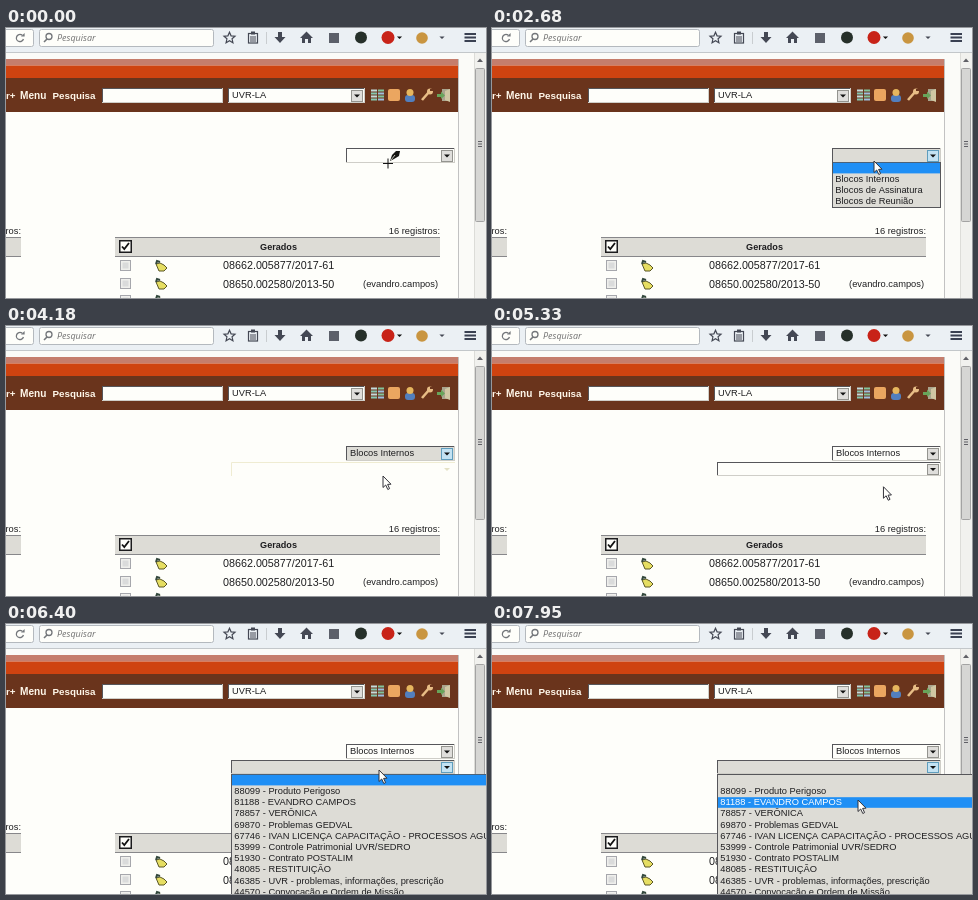
Write an HTML page with a canvas that moves like this. It is 480 by 270 pixels and loops after 8 s.

```html
<!DOCTYPE html>
<html lang="pt-BR">
<head>
<meta charset="utf-8">
<title>Blocos</title>
<style>
html, body { margin: 0; width: 100%; height: 100%; overflow: hidden; background: #fefefa; }
canvas { display: block; width: 480px; height: 270px; }
</style>
</head>
<body>
<canvas id="stage"></canvas>
<script>
const LOOP = 8000;
const SANS = '"Liberation Sans", Arial, sans-serif';
const INK = '#1e1e20', PANEL = '#dddcd6', PAPER = '#fefefa', BLUE = '#1f8ff5';
const ROW = 11.2;
const canvas = document.getElementById('stage');
const ctx = canvas.getContext('2d');
const ratio = window.devicePixelRatio || 1;
canvas.width = 480 * ratio;
canvas.height = 270 * ratio;
ctx.scale(ratio, ratio);

const blockTypes = ['', 'Blocos Internos', 'Blocos de Assinatura', 'Blocos de Reunião'];
const blocks = [
  '', '88099 - Produto Perigoso', '81188 - EVANDRO CAMPOS', '78857 - VERÔNICA',
  '69870 - Problemas GEDVAL', '67746 - IVAN LICENÇA CAPACITAÇÃO - PROCESSOS AGUARDANDO',
  '53999 - Controle Patrimonial UVR/SEDRO', '51930 - Contrato POSTALIM',
  '48085 - RESTITUIÇÃO', '46385 - UVR - problemas, informações, prescrição',
  '44570 - Convocação e Ordem de Missão'
];

// Moments of the interaction, in ms
const AT = { arrow: 950, typesOpen: 1930, typesClose: 3330, hint: 4180, blocks: 4250, rest: 4330, blocksOpen: 5930 };

// Pointer stops: time, x, y
const stops = [
  [0, 382, 135], [950, 382, 135], [1330, 373, 131], [1480, 373, 131],
  [1630, 383, 129], [1930, 383, 129], [2300, 382, 133], [2780, 382, 133],
  [3200, 377, 150], [4180, 377, 150], [4580, 398, 166], [5180, 398, 166],
  [5630, 373, 146], [6780, 373, 146], [7500, 369, 187], [7600, 369, 187],
  [7930, 366, 176], [LOOP, 366, 176]
];

function rect(x, y, w, h, color) {
  ctx.fillStyle = color;
  ctx.fillRect(x, y, w, h);
}

function text(str, x, y, size = 9.3, color = INK, style = '', align = 'left') {
  ctx.font = `${style} ${size}px ${SANS}`;
  ctx.textAlign = align;
  ctx.fillStyle = color;
  ctx.fillText(str, x, y);
}

function poly(points, fill, stroke, width = 1) {
  ctx.beginPath();
  points.forEach(([x, y]) => ctx.lineTo(x, y));
  ctx.closePath();
  if (fill) { ctx.fillStyle = fill; ctx.fill(); }
  if (stroke) { ctx.strokeStyle = stroke; ctx.lineWidth = width; ctx.stroke(); }
}

function line(points, color, width = 1) {
  ctx.beginPath();
  points.forEach(([x, y]) => ctx.lineTo(x, y));
  ctx.strokeStyle = color;
  ctx.lineWidth = width;
  ctx.stroke();
}

function dot(x, y, r, color) {
  ctx.beginPath();
  ctx.arc(x, y, r, 0, 7);
  ctx.fillStyle = color;
  ctx.fill();
}

function pill(x, y, w, h, r, fill, stroke) {
  ctx.beginPath();
  ctx.roundRect(x, y, w, h, r);
  ctx.fillStyle = fill;
  ctx.fill();
  if (stroke) { ctx.strokeStyle = stroke; ctx.lineWidth = 1; ctx.stroke(); }
}

function sunken(x, y, w, h, fill) {
  rect(x, y, w, h, '#cfcec8');
  rect(x, y, w - 1, h - 1, '#56565a');
  rect(x + 1, y + 1, w - 2, h - 2, fill);
}

function caret(x, y, r = 3, color = '#111') {
  poly([[x - r, y], [x + r, y], [x, y + r]], color);
}

function select(x, y, w, h, label, active) {
  sunken(x, y, w, h, active ? PANEL : PAPER);
  const bx = x + w - 14;
  rect(bx, y + 2, 12, h - 3, active ? '#5f9dbd' : '#94948f');
  rect(bx + 1, y + 3, 10, h - 5, active ? '#c3e2f2' : '#dfdedb');
  caret(bx + 6, y + h / 2 - 1);
  text(label, x + 4, y + h / 2 + 2.5);
}

function list(x, y, w, h, items, current) {
  rect(x, y, w, h, '#56565a');
  rect(x + 1, y + 1, w - 2, h - 2, PANEL);
  items.forEach((item, i) => {
    const top = y + 0.8 + i * ROW;
    if (i === current) rect(x + 1, top, w - 2, ROW - 0.6, BLUE);
    text(item, x + 3.3, top + 8, 9.3, i === current ? '#fff' : INK);
  });
}

function toolbar() {
  rect(0, 0, 480, 25, '#ebf0f4');
  rect(0, 24, 480, 1, '#c3c7ca');
  pill(-6.5, 1.5, 34, 17, 2, PAPER, '#b4b9be');
  pill(33.5, 1.5, 174, 17, 2, PAPER, '#b4b9be');
  ctx.beginPath();
  ctx.arc(14, 10, 3.6, 0.3, 5.4);
  ctx.strokeStyle = '#73767a';
  ctx.lineWidth = 1.3;
  ctx.stroke();
  poly([[15, 8.6], [18.6, 8.6], [18.6, 5]], '#73767a');
  ctx.beginPath();
  ctx.arc(43, 8.5, 3, 0, 7);
  ctx.stroke();
  line([[41, 11], [38, 14]], '#73767a', 1.6);
  ctx.font = 'italic 9px "Open Sans", sans-serif';
  ctx.textAlign = 'left';
  ctx.fillStyle = '#747474';
  ctx.fillText('Pesquisar', 51, 13);

  const gray = '#444854';
  const star = Array.from({ length: 10 }, (_, i) => {
    const r = i % 2 ? 2.7 : 5.8, a = i * Math.PI / 5 - Math.PI / 2;
    return [223.5 + r * Math.cos(a), 10 + r * Math.sin(a)];
  });
  poly(star, null, gray, 1.2);
  ctx.strokeStyle = gray;
  ctx.strokeRect(242.5, 5.5, 9, 9.5);
  rect(245, 3.5, 4, 3, gray);
  for (const y of [8.5, 10.5, 12.5]) rect(244, y, 6, 1, gray);
  rect(260, 4, 1, 12, '#c9cdd0');
  poly([[272, 4], [276, 4], [276, 9], [279.5, 9], [274, 15], [268.5, 9], [272, 9]], gray);
  poly([[300.5, 3.5], [307, 10], [305, 10], [305, 15], [302, 15], [302, 11],
    [299, 11], [299, 15], [296, 15], [296, 10], [294, 10]], gray);
  rect(323, 5, 10, 10, '#5c606a');
  dot(355, 9.5, 6, '#26302a');
  dot(382, 9.5, 6.5, '#c82318');
  caret(393.5, 8.5, 2.6);
  dot(416, 10, 5.8, '#c99540');
  caret(436, 8.5, 2.6, gray);
  for (const y of [5, 8.5, 12]) rect(458.5, y, 11.5, 2, '#3a4152');
}

function scrollbar() {
  rect(468, 25, 12, 245, '#f1f1ee');
  rect(468, 25, 1, 245, '#dcdcd8');
  poly([[471, 34], [477, 34], [474, 30.5]], '#606066');
  pill(469.5, 40.5, 9, 153, 1, '#d6d6d4', '#a3a3a3');
  for (const y of [113, 115.5, 118]) rect(472, y, 4, 1, '#606066');
}

function menuBar() {
  rect(0, 31, 452, 6.5, '#c57d6c');
  rect(0, 37.5, 452, 12.5, '#cf4310');
  rect(0, 50, 452, 34, '#6a341c');
  text('r+', 0, 71, 9.8, '#fff7ea', 'bold');
  text('Menu', 14, 71, 10.1, '#fff7ea', 'bold');
  text('Pesquisa', 46.5, 71, 9.8, '#fff7ea', 'bold');
  sunken(96, 60, 121, 15, PAPER);
  select(222, 60, 137, 15, 'UVR-LA', false);
  for (let i = 0; i < 4; i++) {
    rect(365, 61.5 + i * 3, 6, 2, i % 2 ? '#86c7b0' : '#c3dcdd');
    rect(372, 61.5 + i * 3, 6, 2, i % 2 ? '#9ebfdf' : '#82c39b');
  }
  pill(382, 61, 12, 12, 2, '#eba660');
  pill(399, 67, 10, 7, 3, '#527fbe');
  dot(404, 64.5, 3.5, '#e6b65e');
  line([[416, 72], [423, 64]], '#e8bd86', 2.6);
  dot(424, 63.5, 3, '#e8bd86');
  rect(424, 61, 3, 2, '#6a341c');
  rect(436, 61, 8, 12, '#a9a58e');
  poly([[439, 63], [444, 61], [444, 74], [439, 72]], '#d0c7a3');
  poly([[431, 66], [435, 66], [435, 63.5], [439, 67.5], [435, 71], [435, 69], [431, 69]], '#68a45a');
}

function headerBand(x, w) {
  rect(x, 209, w, 20, '#87878a');
  rect(x, 210, w, 18, PANEL);
}

function checkbox(y) {
  rect(114, y, 11, 11, '#a6a7ac');
  rect(115, y + 1, 9, 9, '#efefec');
  rect(116.5, y + 2.5, 6, 6, '#dadbdb');
}

function note(y) {
  poly([[150, y - 2], [154, y - 3], [158, y - 1], [161, y + 2], [158, y + 5], [153, y + 5]], '#e6de62', '#5a5626');
  line([[150, y - 2], [151, y - 5], [154, y - 4]], '#33483c', 2);
}

function table() {
  text('ros:', 15, 206, 9.3, INK, '', 'right');
  headerBand(0, 15);
  text('16 registros:', 434, 206, 9.3, INK, '', 'right');
  headerBand(109, 325);
  rect(113, 212, 13, 13, '#1c1c1e');
  rect(114.5, 213.5, 10, 10, PAPER);
  line([[116, 218.5], [118.3, 221], [123, 215]], '#111', 1.8);
  text('Gerados', 272.5, 222, 9.1, INK, 'bold', 'center');
  for (const y of [232, 250, 267]) {
    checkbox(y);
    note(y + 6);
  }
  text('08662.005877/2017-61', 217, 241, 10.75);
  text('08650.002580/2013-50', 217, 260, 10.75);
  text('(evandro.campos)', 432, 259, 9.3, INK, '', 'right');
}

function page() {
  rect(0, 0, 480, 270, '#fbfbf8');
  toolbar();
  rect(0, 31, 453, 239, '#c2c2c2');
  rect(0, 32, 452, 238, PAPER);
  menuBar();
  table();
  scrollbar();
}

function pen() {
  line([[382, 130.5], [382, 140.5]], '#111');
  line([[377, 135.5], [387, 135.5]], '#111');
  poly([[384, 133], [386, 127], [390, 123], [394, 123], [393, 128], [388, 131]], '#161612');
  line([[385, 132], [389, 127]], '#f5f5e6', 0.8);
}

function arrow(x, y) {
  const shape = [[0, 0], [0, 11.5], [2.7, 9], [4.8, 13.5], [6.6, 12.6], [4.6, 8.4], [8, 8.2]];
  poly(shape.map(([dx, dy]) => [x + dx, y + dy]), '#fffffc', '#33333a');
}

function pointer(t) {
  const i = stops.findIndex(s => s[0] > t);
  const [t0, x0, y0] = stops[i - 1], [t1, x1, y1] = stops[i];
  const p = (t - t0) / (t1 - t0), k = p * p * (3 - 2 * p);
  return [x0 + (x1 - x0) * k, y0 + (y1 - y0) * k];
}

function draw(t) {
  const [x, y] = pointer(t);
  const rowAt = top => Math.max(0, Math.floor((y - top) / ROW));
  page();

  const chosen = t >= AT.typesClose;
  select(340, 120, 109, 15, chosen ? blockTypes[1] : '', t >= AT.typesOpen && t < AT.rest);
  if (t >= AT.blocks) {
    select(225, 136, 224, 14, '', t >= AT.blocksOpen);
  } else if (t >= AT.hint) {
    line([[225.5, 150], [225.5, 136.5], [449, 136.5]], '#efecd2');
    caret(441, 142, 3, '#e4e1c6');
  }
  if (t >= AT.typesOpen && !chosen) list(340, 134, 109, 46, blockTypes, rowAt(135));
  if (t >= AT.blocksOpen) list(225, 150, 260, 126, blocks, rowAt(151));

  if (t < AT.arrow) pen();
  else arrow(x, y);
}

const start = performance.now();
function tick() {
  draw((performance.now() - start) % LOOP);
  requestAnimationFrame(tick);
}
tick();
</script>
</body>
</html>
```
